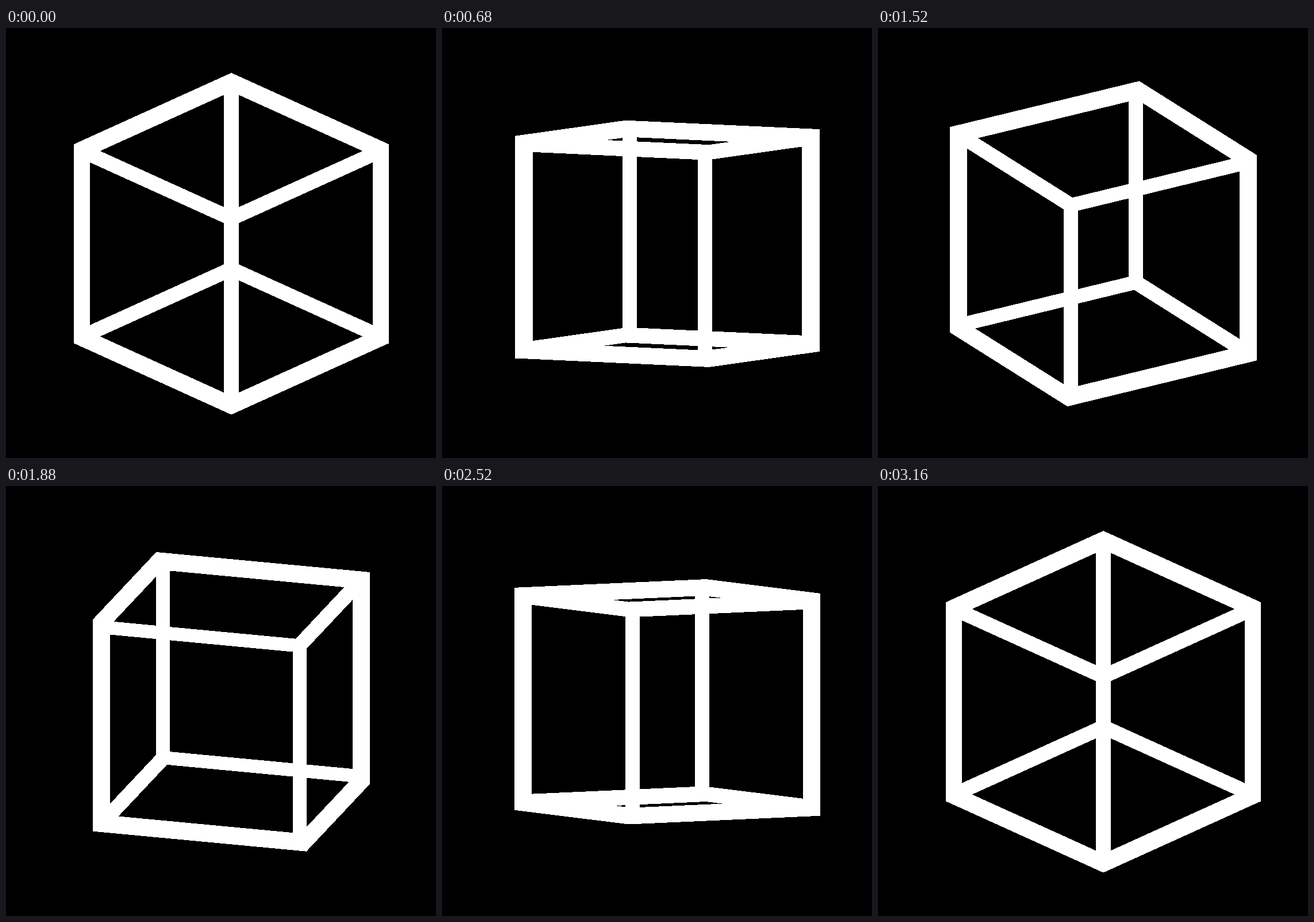
Animation of 748x748 px, one loop 3.2 s. Source, as an HTML page:

```html
<!DOCTYPE html>
<html>
<head>
<meta charset="utf-8">
<title>Rotating cube frame</title>
<style>
html, body { margin: 0; width: 100%; height: 100%; overflow: hidden; background: #000; }
svg { display: block; }
</style>
</head>
<body>
<svg width="748" height="748" viewBox="0 0 748 748">
  <path id="cube" fill="#fff" shape-rendering="crispEdges"/>
</svg>
<script>
const cube = document.getElementById('cube');
const CX = 392, CY = 375.3;
const R = 194;                  // half side of the cube
const H = 166.3;                // half side of the openings
const OUT = 184.5, IN = 181.8;  // opening planes
const TILT = 26.95 * Math.PI / 180;
const STEP = 40, LOOP = 3200, TURN = 41, LAST = 79;

// Bar cross-section: two coordinates across the bar, then its half length
const profile = [[R, R, R], [H, OUT, H], [H, IN, H], [IN, H, H], [OUT, H, H]];

// Four-cornered pieces of the twelve bars
const quads = [];
for (let axis = 0; axis < 3; axis++)
  for (const sb of [-1, 1])
    for (const sc of [-1, 1]) {
      const place = ([b, c, len], end) => {
        const p = [];
        p[axis] = len * end;
        p[(axis + 1) % 3] = b * sb;
        p[(axis + 2) % 3] = c * sc;
        return p;
      };
      profile.forEach((q, i) => {
        const r = profile[(i + 1) % profile.length];
        quads.push([place(q, -1), place(q, 1), place(r, 1), place(r, -1)]);
      });
    }

function draw(frame) {
  // Two linear half turns, the camera swinging from below to above and back
  const k = frame < TURN ? frame / TURN : 1 + (frame - TURN) / (LAST - TURN);
  const yaw = Math.PI * (k + 0.25);
  const tilt = TILT * (1 - 2 * Math.abs(1 - k));
  const cy = Math.cos(yaw), sy = Math.sin(yaw);
  const ct = Math.cos(tilt), st = Math.sin(tilt);
  const project = ([x, y, z]) =>
    [CX + x * cy + z * sy, CY + y * ct + (z * cy - x * sy) * st];

  const pieces = quads.map(quad => {
    const p = quad.map(project);
    // Equal winding, so overlapping pieces never cancel out
    const area = p.reduce((sum, [x, y], i) => {
      const [u, v] = p[(i + 1) % 4];
      return sum + x * v - u * y;
    }, 0);
    if (area < 0) p.reverse();
    return 'M' + p.map(q => q.map(n => n.toFixed(3))).join('L') + 'Z';
  });
  cube.setAttribute('d', pieces.join(''));
}

const start = performance.now();
function tick() {
  const t = (performance.now() - start) % LOOP;
  draw(Math.floor(t / STEP));
  requestAnimationFrame(tick);
}
tick();
</script>
</body>
</html>
```
